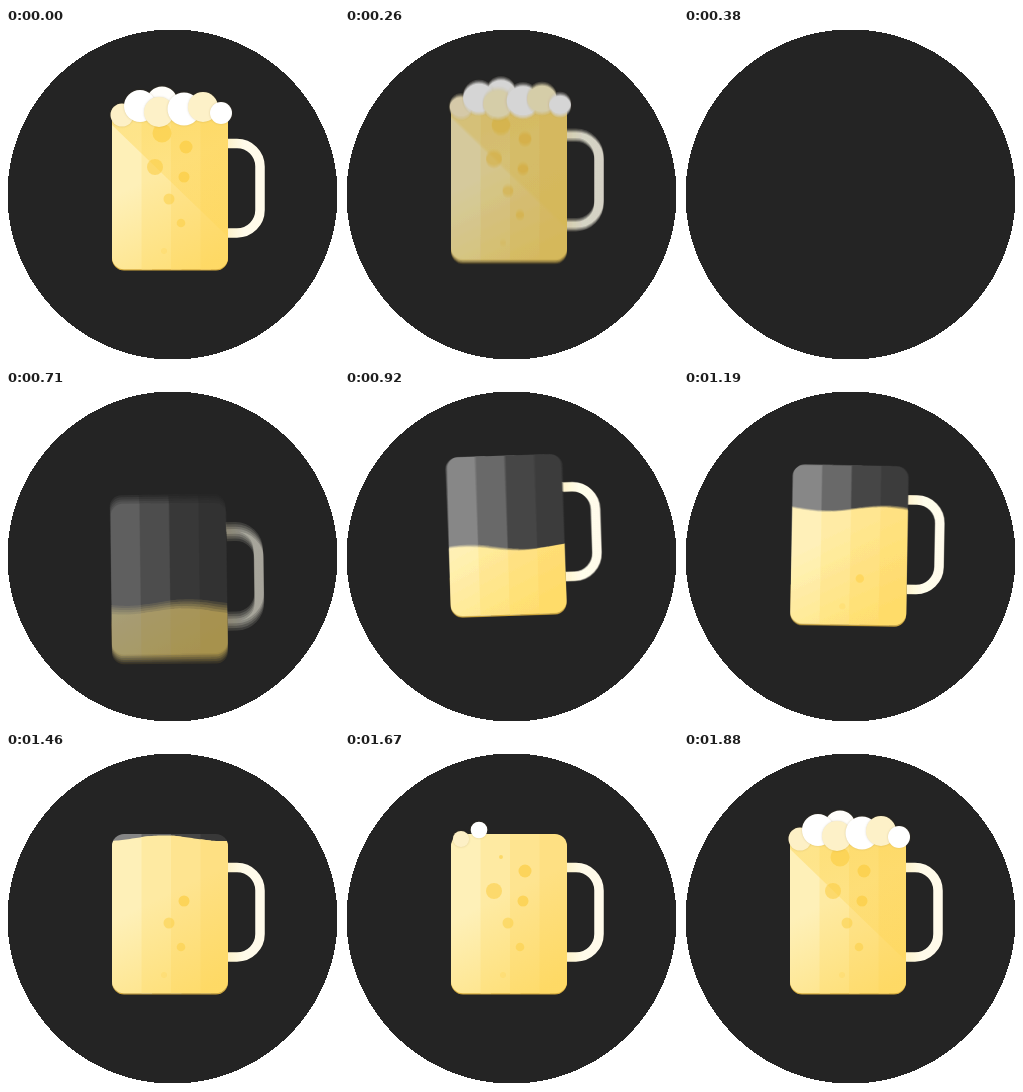
These frames come from a looping animation (333x334 px, 2.18 s). An HTML page with a canvas:

```html
<!DOCTYPE html>
<html lang="en">
<head>
<meta charset="utf-8">
<title>Beer mug</title>
<style>
html, body { margin: 0; width: 100%; height: 100%; overflow: hidden; background: #fff; }
canvas { display: block; width: 100vw; height: 100vh; }
</style>
</head>
<body>
<canvas id="stage" width="333" height="334"></canvas>
<script>
const W = 333, H = 334, LOOP = 2180, STEP = 30;
const LEFT = 106, TOP = 82, WIDE = 116, TALL = 160, BASE = TOP + TALL, MID = LEFT + WIDE / 2;
const HUB = 166.5, RADIUS = 165;

const ctx = document.getElementById('stage').getContext('2d');
const layer = () => {
  const c = document.createElement('canvas');
  c.width = W;
  c.height = H;
  return c.getContext('2d');
};
const mug = layer(), blur = layer();

const glass = ['#858585', '#666666', '#464646', '#383838'];
const beer = ['#fef0b8', '#feeaa2', '#fee490', '#fee083'];

// x, y, radius, opacity, time of appearance
const bubbles = [
  [158, 223, 3, .2, 1070], [175, 195, 4.3, .5, 1090], [163, 171, 5.5, .5, 1250],
  [178, 149, 5.5, .65, 1350], [149, 139, 8, .55, 1490], [180, 119, 6.5, .65, 1570],
  [156, 105, 9.5, .6, 1640]
];

// x, y, radius, colour, time of appearance
const foam = [
  [156, 74, 15.5, '#fffefb', 1685], [116, 87, 11.5, '#fdf0c6', 1640],
  [134, 78, 16, '#ffffff', 1650], [153, 84, 15, '#fdf1c8', 1670],
  [178, 81, 16.5, '#ffffff', 1700], [197, 79, 15, '#fdf1c8', 1715],
  [215, 85, 11, '#ffffff', 1730]
];

const part = (t, a, b) => Math.min(1, Math.max(0, (t - a) / (b - a)));
const sine = p => (1 - Math.cos(Math.PI * p)) / 2;
const back = p => 1 + 2.7 * (p - 1) ** 3 + 1.7 * (p - 1) ** 2;
const glide = (t, a, b, from, to) => from + (to - from) * sine(part(t, a, b));

function lift(t) {
  if (t < 500) return -110 * part(t, 170, 385) ** 3;
  if (t < 920) return -16.5 + 114 * (1 - part(t, 630, 920)) ** 3;
  return glide(t, 920, 1400, -16.5, 0);
}

function tilt(t) {
  if (t < 830) return glide(t, 670, 830, 0, -5);
  if (t < 1070) return glide(t, 830, 1070, -5, 5);
  return glide(t, 1070, 1240, 5, 0);
}

function opacity(t) {
  return t < 500 ? 1 - part(t, 200, 380) ** 1.5 : part(t, 620, 770);
}

function disc(g, x, y, r, fill) {
  g.fillStyle = fill;
  g.beginPath();
  g.arc(x, y, Math.max(0, r), 0, 7);
  g.fill();
}

// Row by row, for a hard edge
function drawGround() {
  ctx.fillStyle = '#fff';
  ctx.fillRect(0, 0, W, H);
  ctx.fillStyle = '#242424';
  for (let y = 0; y < H; y++) {
    const half = Math.sqrt(Math.max(0, RADIUS ** 2 - (y + .5 - HUB) ** 2));
    const x = Math.round(HUB - half);
    if (half) ctx.fillRect(x, y, W - 2 * x, 1);
  }
}

function stripes(g, colours) {
  colours.forEach((c, i) => {
    g.fillStyle = c;
    g.fillRect(LEFT + i * 29.5, TOP - 2, 40, TALL + 4);
  });
}

function drawHandle(g) {
  const tone = g.createLinearGradient(222, 0, 258, 0);
  tone.addColorStop(0, '#fdf3cc');
  tone.addColorStop(.45, '#fffbea');
  tone.addColorStop(1, '#fffaea');
  g.strokeStyle = tone;
  g.lineWidth = 9.5;
  g.beginPath();
  g.moveTo(220, 115.5);
  g.arcTo(254, 115.5, 254, 160, 23);
  g.arcTo(254, 205, 220, 205, 23);
  g.lineTo(220, 205);
  g.stroke();
}

function drawBeer(g, t, full) {
  const level = BASE - glide(t, 700, 1570, 52, TALL);
  g.save();
  if (!full) {
    const trough = 140 + (t - 1190) * .28;
    g.beginPath();
    g.moveTo(LEFT - 2, BASE + 4);
    for (let x = LEFT - 2; x <= LEFT + WIDE + 2; x += 2) {
      g.lineTo(x, level + 2.8 * Math.cos((x - trough) / WIDE * 2 * Math.PI));
    }
    g.lineTo(LEFT + WIDE + 2, BASE + 4);
    g.clip();
  }
  stripes(g, beer);
  const warm = g.createLinearGradient(MID - 20, 150, MID + 25, BASE);
  warm.addColorStop(0, 'rgba(255,208,60,0)');
  warm.addColorStop(1, 'rgba(255,208,60,.42)');
  g.fillStyle = warm;
  g.fillRect(LEFT, TOP, WIDE, TALL);

  const shade = t < 500 ? 1 : part(t, 1700, 1880);
  if (shade) {
    const tone = g.createLinearGradient(150, 100, 200, 220);
    tone.addColorStop(0, 'rgba(253,205,50,.34)');
    tone.addColorStop(1, 'rgba(253,205,50,.12)');
    g.globalAlpha = shade;
    g.fillStyle = tone;
    g.beginPath();
    g.moveTo(LEFT, TOP);
    g.lineTo(LEFT, 97);
    g.lineTo(LEFT + WIDE, 209);
    g.lineTo(LEFT + WIDE, TOP);
    g.fill();
    g.globalAlpha = 1;
  }
  for (const [x, y, r, a, at] of bubbles) {
    const p = t < 500 ? 1 : sine(part(t, at, at + 100));
    if (p) disc(g, x, y, r * p, `rgba(252,205,64,${a})`);
  }
  g.restore();
}

function drawFoam(g, t) {
  g.save();
  g.shadowColor = 'rgba(120,90,20,.25)';
  g.shadowBlur = 2;
  for (const [x, y, r, c, at] of foam) {
    const p = t < 500 ? 1 : part(t, at, at + 150);
    if (p) disc(g, x, y, r * back(p), c);
  }
  g.restore();
}

function drawMug(g, t) {
  const full = t < 500 || t > 1580;
  g.clearRect(0, 0, W, H);
  g.save();
  g.translate(MID, BASE + lift(t));
  g.rotate(tilt(t) * Math.PI / 180);
  g.translate(-MID, -BASE);
  drawHandle(g);
  g.fillStyle = '#d2a83c';
  g.beginPath();
  g.roundRect(LEFT, BASE - 40, WIDE, 40.5, [0, 0, 12, 12]);
  g.fill();
  g.save();
  g.beginPath();
  g.roundRect(LEFT, TOP, WIDE, TALL - .8, 12);
  g.clip();
  if (!full) stripes(g, glass);
  drawBeer(g, t, full);
  g.restore();
  drawFoam(g, t);
  g.restore();
}

function render(t) {
  drawGround();
  const alpha = opacity(t);
  if (!alpha) return;

  // Average a few moments around t for motion blur
  const moving = (t >= 200 && t < 400) || (t > 600 && t < 1400);
  const n = moving ? 5 : 1;
  blur.clearRect(0, 0, W, H);
  blur.globalCompositeOperation = 'lighter';
  blur.globalAlpha = 1 / n;
  for (let i = 0; i < n; i++) {
    drawMug(mug, t + ((i + .5) / n - .5) * 18);
    blur.drawImage(mug.canvas, 0, 0);
  }
  ctx.save();
  ctx.beginPath();
  ctx.arc(HUB, HUB, RADIUS, 0, 7);
  ctx.clip();
  ctx.globalAlpha = alpha;
  ctx.drawImage(blur.canvas, 0, 0);
  ctx.restore();
}

const start = performance.now();
function tick() {
  const t = (performance.now() - start) % LOOP;
  render(t < 200 ? 0 : Math.floor((t - 20) / STEP) * STEP + 20);
  requestAnimationFrame(tick);
}
tick();
</script>
</body>
</html>
```
